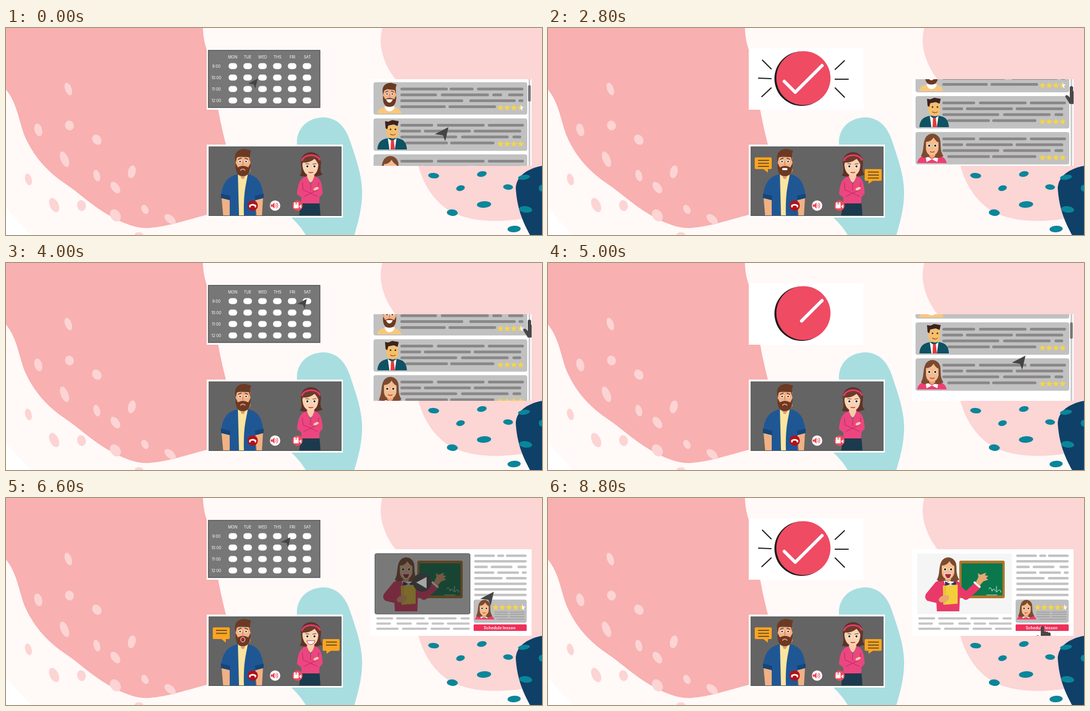
Recreate the animation shown at these times as an HTML page. Size 980x380 px, loop 9 s.

```html
<!DOCTYPE html>
<html lang="en">
<head>
<meta charset="utf-8">
<style>
  html, body { margin: 0; width: 980px; height: 380px; overflow: hidden; }
  svg { display: block; }
  text { font-family: Inter, sans-serif; text-anchor: middle; fill: #fff; }
  .line { fill: none; stroke-linecap: round; stroke-linejoin: round; }
</style>
</head>
<body>
<svg id="stage" width="980" height="380" viewBox="0 0 980 380"></svg>
<script>
const ellipses = (list, fill) => `<g fill="${fill}">` + list.map(([x, y, rx, ry, turn = 0]) =>
  `<ellipse rx="${rx}" ry="${ry}" transform="translate(${x} ${y}) rotate(${turn})"/>`).join('') + '</g>';

// Each row of bars is written as "from-to from-to ..."
const bars = (y, spec, width = 5, color = '#898787') => spec.split(' ').map(s => {
  const [a, b] = s.split('-').map(Number), r = width / 2;
  return `<path class="line" stroke="${color}" stroke-width="${width}" d="M${a + r} ${y}H${b - r}"/>`;
}).join('');

const star = (x, y, fill = '#fbd63c') => `<polygon fill="${fill}" points="${
  Array.from({ length: 10 }, (_, i) => {
    const r = i % 2 ? 2.6 : 6.3, a = i * Math.PI / 5;
    return (x + r * Math.sin(a)).toFixed(1) + ',' + (y - r * Math.cos(a)).toFixed(1);
  }).join(' ')}"/>`;
const stars = (x, y, count, half) => Array.from({ length: count }, (_, i) =>
  star(x + i * 12.3, y, half && i === count - 1 ? 'url(#half)' : undefined)).join('');

const background = `
  <rect width="980" height="380" fill="#fff9f8"/>
  <path fill="#fff" d="M0 330L45 380H0Z"/>
  <path fill="#f8b0b0" d="M0 0H360C361 25 366 38 372 52C380 80 381 120 388 150C393 178 398 197 402 214L410 320L367 343C330 352 300 364 262 367C235 369 205 354 185 342C155 324 135 304 110 287C76 265 50 235 34 198C22 165 20 138 0 113Z"/>
  ${ellipses([[114, 112, 6, 12, -20], [59, 187, 7, 12, -15], [116, 179, 8, 9, -20], [166, 205, 8, 10, -35],
    [107, 241, 7, 15, -22], [166, 271, 6, 11, -15], [230, 264, 7, 12, 12], [41, 278, 6, 11, -15],
    [200, 293, 7, 12, -35], [88, 325, 8, 14, -25], [138, 326, 8, 10, -15], [200, 344, 9, 12, -35],
    [254, 333, 6, 9, -30], [300, 351, 7, 12, -50], [243, 380, 8, 5]], '#fcd4d4')}
  <path fill="#fcd5d5" d="M688 0C679 34 692 68 712 94C732 140 747 200 754 253C764 290 784 320 815 338C850 355 900 361 980 344V0Z"/>
  <path fill="#a8dee0" d="M532 214C530 186 550 164 582 164C608 166 622 184 630 210C640 240 650 268 651 298C652 330 643 358 637 380H548C539 365 531 357 521 347Z"/>
  <path fill="#0f4068" d="M980 253C955 258 934 270 932 293C934 330 944 354 958 380H980Z"/>
  ${ellipses([[782, 271, 10, 5, 5], [870, 268, 9, 5, -12], [831, 294, 8, 5, -12], [874, 324, 13, 6, -3],
    [816, 339, 10, 6, 5], [929, 369, 12, 6, -4], [918, 292, 9, 5, 5], [947, 274, 11, 4.5, -8],
    [950, 333, 12, 6, 6], [979, 294, 5, 6]], '#09869a')}`;

const calendar = `<g id="calendar">
  <rect x="370" y="41" width="204" height="105" fill="#777" stroke="#505050" stroke-width="1.4"/>
  ${['MON', 'TUE', 'WED', 'THS', 'FRI', 'SAT'].map((day, i) =>
    `<text x="${414.5 + i * 27.3}" y="55.5" font-size="7">${day}</text>` +
    [70, 91, 112, 133].map(y => `<rect x="${407 + i * 27.1}" y="${y - 5.5}" width="15.5" height="11" rx="5" fill="#fff"/>`).join('')).join('')}
  ${[9, 10, 11, 12].map((h, i) => `<text x="384.5" y="${72.5 + i * 21}" font-size="7">${h}:00</text>`).join('')}
  <use id="slotCursor" href="#arrow"/></g>`;

const confirmation = `<g id="confirmation">
  <circle cx="464" cy="93" r="50" fill="#1d1b1c"/><circle cx="467" cy="92" r="49.5" fill="#ef4b63"/>
  <path id="check" class="line" stroke="#fff" stroke-width="6" pathLength="100" d="M501 69L452 118L432 98"/>
  <path id="rays" class="line" stroke="#1d1b1c" stroke-width="2" pathLength="100" d=""/></g>`;

const bubble = (x, y, tail) => `<g transform="translate(${x} ${y})">
  <rect width="31" height="21.5" rx="2" fill="#fba520"/><path fill="#fba520" d="${tail}"/>
  ${[5.5, 11, 16.5].map(v => `<path class="say" stroke="#6e5125" stroke-width="2" d="M6 ${v}H26"/>`).join('')}</g>`;

const call = `
  <rect x="367" y="214" width="249" height="134" fill="#fff"/>
  <rect x="371" y="218" width="242" height="126.5" fill="#646464" stroke="#4d4d4d"/>
  <path fill="#f0b184" d="M394 310H412V344H397ZM455 310H470L468 344H458Z"/>
  <path fill="#1f5795" d="M421 269L446 269C461 274 469 284 471 312L456 316V344H409V316L393 312C395 285 404 274 421 269Z"/>
  <path fill="#164578" d="M393 304L410 308V316L393 312ZM455 308L471 304V312L456 316Z"/>
  <path fill="#fbe59f" d="M424 269H442C439 288 434 300 435 344H426Z"/>
  <path fill="#e09b70" d="M425 264H441L435 277H431Z"/>
  <use href="#beardy"/>
  <g id="manMouths">
    <path class="line" stroke="#e08c80" stroke-width="2" d="M429 261Q433 257 437 261"/>
    <rect x="428" y="257" width="10" height="4" rx="2" fill="#fff"/>
    <ellipse cx="433" cy="260" rx="4" ry="4.5" fill="#a82430" stroke="#fff" stroke-width="1"/></g>
  <path fill="#5f3225" d="M537 271C545 262 535 248 541 238C548 224 570 225 575 240C578 252 571 262 579 269C566 275 548 274 537 271Z"/>
  <path fill="#1c3a4d" d="M540 318H573L575 344H536Z"/>
  <path fill="#f8cda8" d="M551 262H563L564 277L557 284L550 277Z"/>
  <path fill="#ec4680" d="M550 272L557 288L564 272C573 274 578 282 579 304L573 311V322H540V311L532 305C534 285 538 275 550 272Z"/>
  <path class="line" stroke="#c42d65" stroke-width="1.3" d="M542 284L543 297L569 309M572 284L570 297L545 309M557 288V298"/>
  <ellipse cx="567" cy="295" rx="5" ry="2.5" fill="#f8cda8" transform="rotate(-25 567 295)"/>
  <path fill="#fad3b0" d="M542 246C542 237 570 237 571 246C572 262 566 271 557 271C548 271 541 262 542 246Z"/>
  <path fill="#6d3a2a" d="M540 256C538 236 549 231 559 233C570 232 575 242 573 256C571 249 568 244 564 240C557 247 547 247 543 247Z"/>
  <path class="line" stroke="#e63b72" stroke-width="3" d="M541 243C546 231 568 230 574 242"/>
  <g fill="#fff"><circle cx="551" cy="254" r="3.2"/><circle cx="564" cy="254" r="3.2"/></g>
  <g fill="#3d2018"><circle cx="551" cy="254" r="2"/><circle cx="564" cy="254" r="2"/></g>
  <path class="line" stroke="#5f3225" stroke-width="1.2" d="M548 249L554 250M561 250L567 249"/>
  <path id="womanClosed" class="line" stroke="#cb3e52" stroke-width="1.8" d="M554 265Q557 266 561 265"/>
  <path id="womanSmile" fill="#fff" stroke="#b53848" d="M550 262H565Q563 269 557 269Q552 269 550 262Z"/>
  <g id="bubbles">${bubble(378, 237.5, 'M14 20H24V28Z')}${bubble(579, 259, 'M7 20H17L7 27Z')}</g>
  <circle cx="451" cy="326" r="9.5" fill="#b11219"/>
  <path class="line" stroke="#fff" stroke-width="3" d="M446 328V326Q451 323 456 326V328"/>
  <circle cx="492" cy="326" r="9.5" fill="#fff"/>
  <path fill="#ee4a5c" d="M484 324H487L491 320.500V331.500L487 328H484Z"/>
  <path class="line" stroke="#ee4a5c" stroke-width="1.2" d="M493 323.500Q495 326 493 328.500M495 321.500Q499 326 495 330.500"/>
  <circle cx="533" cy="326" r="9.5" fill="#ee4a5c"/>
  <path fill="#fff" d="M526 324H535V331H526ZM536 327L540 324V331L536 328Z"/>
  <g fill="#fff"><circle cx="528" cy="322" r="2"/><circle cx="533" cy="322" r="2"/></g>`;

const row2 = ['721-781 788-875 881-947', '721-759 764-850 855-942', '721-825 832-919 926-942', '730-808 812-893'];
const row1 = ['721-808 811-855 861-946', '721-788 795-883 889-907 918-946', '721-836 847-932 937-946', '721-804 809-896'];
const card = (y, rows, half, avatar) => `<rect x="672" y="${y}" width="281" height="59.5" rx="4" fill="#c1c1c1"/>
  ${rows.map((spec, i) => bars(y + 12.5 + i * 10.8, spec)).join('')}${stars(904, y + 47, 4, half)}${avatar}`;

const list = `<g id="list"><g id="cards">
  ${card(99.500, row1, true, `
    <path fill="#f7c87c" d="M678 157C680 147 690 144 701 144C713 144 721 148 723 157Z"/>
    <path fill="#fff" d="M692 144H711Q709 153 701 153Q694 153 692 144Z"/>
    <g transform="translate(320 -94.5) scale(.88)"><use href="#beardy"/>
      <path fill="#fff" d="M426 256H440Q438 263 433 263Q428 263 426 256Z"/></g>`)}
  ${card(166, row2, false, `
    <path fill="#0e5263" d="M679 223C680 207 689 204 699 202H714C726 204 732 208 733 223Z"/>
    <path fill="#fff" d="M698 202L706 208L714 202L711 223H701Z"/>
    <path fill="#e8383d" d="M704 206H709L711 223H703Z"/>
    <path fill="#f4c06c" d="M695 179H717V195Q715 203 707 203Q697 202 695 192Z"/>
    <path fill="#3f2219" d="M694 184L693 171L699 172L706 169L718 171L716 180L709 177L699 179L697 186Z"/>
    <g fill="#3f2219"><circle cx="703" cy="186" r="1.5"/><circle cx="712" cy="186" r="1.5"/></g>
    <path class="line" stroke="#b5523d" stroke-width="1.5" d="M703 195Q708 198 712 195"/>`)}
  ${card(232, row2, false, `
    <path fill="#ee3f70" d="M675 289C677 277 688 273 702 273C716 273 727 278 729 289Z"/>
    <path fill="#fff" d="M690 274L702 282L714 274L712 287L702 282L692 287Z"/>
    <use href="#lady" x="702" y="256"/>`)}</g>
  <path stroke="#c9c9c9" stroke-width="3" d="M957 94V253"/>
  <rect id="thumb" x="954.5" width="5" height="30" rx="2" fill="#777"/></g>`;

const teacher = `
  <rect x="752" y="115" width="83" height="69" rx="3" fill="#b0762a"/>
  <rect x="756" y="120" width="75" height="59" fill="#0b774d"/>
  <path class="line" stroke="#d9eee0" d="M806 167Q809 160 812 171Q815 163 818 171M820 162V173Q827 164 828 173M802 178H821"/>
  <g id="arm"><path class="line" stroke="#ea3968" stroke-width="14" d="M749 166L764 180L784 162"/>
    <path class="line" stroke="#fff" stroke-width="4" d="M780 155L789 163"/>
    <path fill="#e8a872" d="M782 155L787 145L786 138L791 141L801 137L799 142L805 143L801 147L805 150L796 153L789 161Z"/></g>
  <path fill="#ea3968" d="M709 154L722 149H743L754 156L752 208H711L710 190L694 189Q687 184 691 176Z"/>
  <path fill="#fff" d="M723 150H743L738 165H728Z"/>
  <path fill="#283466" d="M726 153L736 158L746 153V162L736 158L726 162Z"/>
  <path fill="#f4ce3a" d="M722 161L749 159V194L723 196Z"/><path stroke="#c8a729" d="M726 162V195"/>
  <path class="line" stroke="#ea3968" stroke-width="11" d="M701 185L714 188"/>
  <ellipse cx="724" cy="185" rx="10" ry="6" fill="#e8a872" transform="rotate(-20 724 185)"/>
  <use href="#lady" x="731" y="130"/>
  <path fill="#a9283d" stroke="#fff" d="M725 139H738Q736 148 731 148Q727 147 725 139Z"/>`;

const detail = `<g id="detail">
  <rect x="675" y="102" width="173" height="111" rx="2" fill="#f5f5f6"/>${teacher}
  <g id="paused"><rect x="674.5" y="102" width="174" height="111" rx="3" fill="#222" fill-opacity=".58" stroke="#555"/>
    <circle cx="761" cy="155" r="17" fill="#333"/><path fill="#a5a5a5" d="M750 155L769 145V166Z"/></g>
  ${['677-708 713-766 772-824 831-848', '677-704 714-742 750-773 778-801 806-848', '677-718 724-770 776-812 817-848']
    .map((s, i) => bars(221 + i * 9.500, s, 4, '#c5c5c5')).join('')}
  ${['856-894 898-911 914-952', '856-952', '856-881 886-926 935-952', '856-893 898-938 943-952', '856-908 914-952',
    '856-952', '856-952', '856-952'].map((s, i) => bars(106 + i * 10.3, s, 4.5, '#c2c2c2')).join('')}
  <rect x="855" y="186.500" width="97" height="42.500" rx="4" fill="#bebebe"/>
  ${[209.500, 213.500, 218, 222.500].map((y, i) => bars(y, i < 3 ? '893-918 921-948' : '897-948', 1.7, '#9c9c9c')).join('')}
  ${stars(895, 201, 5, true)}
  <path fill="#ee3f70" d="M857 223Q861 212 874 212Q889 212 893 223Z"/>
  <path fill="#fff" d="M867 212L874 218L882 212L880 221L874 218L868 221Z"/>
  <use href="#lady" transform="translate(874 202) scale(.72)"/>
  <rect id="button" x="855" y="232" width="97" height="12" rx="1.5" fill="#ef315a"/>
  <text x="902.5" y="240.800" font-size="7.3" font-weight="600">Schedule lesson</text></g>`;

document.getElementById('stage').innerHTML = `<defs>
  <linearGradient id="half"><stop offset=".5" stop-color="#fbd63c"/><stop offset=".5" stop-color="#fff"/></linearGradient>
  <clipPath id="panel"><path d="M666 94H961V253H666Z"/></clipPath>
  <path id="arrow" fill="#444" d="M0 0L-25 13L-10 15L-6 26Z"/>
  <path id="hand" fill="#484848" d="M-3 2Q0 -2 3 2V10Q6 8 7 11Q10 9 11 12Q15 11 15 15V25L11 33H-3L-11 20Q-11 15 -6 18L-3 21Z"/>
  <g id="beardy"><path fill="#f2b387" d="M420 237H447V262Q443 270 433 270Q423 269 420 260Z"/>
    <path fill="#6c3923" d="M420 247C416 231 422 222 437 222L448 225L446 232L447 247L444 237L428 235L422 238Z"/>
    <path fill="#6c3923" d="M420 248L424 256Q433 250 443 256L447 248C448 264 443 272 433 272C423 272 418 263 420 248Z"/>
    <g fill="#fff"><circle cx="428" cy="245" r="2.800"/><circle cx="439" cy="245" r="2.800"/></g>
    <g fill="#3a2018"><circle cx="428" cy="245" r="1.600"/><circle cx="439" cy="245" r="1.600"/></g>
    <path class="line" stroke="#6c3923" stroke-width="1.6" d="M425 241L430 239M437 239L442 241"/>
    <path class="line" stroke="#dd8c68" stroke-width="2" d="M433 246V251"/></g>
  <g id="lady"><path fill="#7c4a2f" d="M-12 -13C-6 -24 10 -24 15 -10C17 0 14 10 21 20Q12 26 3 22H-8Q-16 25 -20 20C-14 10 -17 -3 -12 -13Z"/>
    <path fill="#e8a872" d="M-5 12H6V20L0 25L-5 20Z"/>
    <path fill="#f3bd8e" d="M-11 -6Q-2 -6 3 -14Q7 -7 12 -5V7Q10 18 0 19Q-10 18 -11 7Z"/>
    <g fill="#fff"><circle cx="-5" cy="1" r="3"/><circle cx="6" cy="1" r="3"/></g>
    <g fill="#3a2018"><circle cx="-5" cy="1" r="2"/><circle cx="6" cy="1" r="2"/></g>
    <path class="line" stroke="#c23b4b" stroke-width="1.600" d="M-3 12Q1 14 4 12"/></g>
  </defs>${background}<rect x="367" y="37" width="210" height="113" fill="#fff"/>${calendar}${confirmation}${call}
  <g clip-path="url(#panel)"><rect x="666" y="94" width="295" height="159" fill="#fff"/>${list}${detail}
  <use id="pointer" href="#arrow"/><use id="finger" href="#hand"/></g>`;

const el = id => document.getElementById(id);
const show = (node, on) => node.style.display = on ? '' : 'none';
const move = (id, x, y, scale = 1) => el(id).setAttribute('transform', `translate(${x} ${y}) scale(${scale})`);

// Linear interpolation through [time, ...values] keys
function track(keys, t) {
  const i = keys.findIndex(k => k[0] > t);
  if (i < 0) return keys.at(-1).slice(1);
  if (i === 0) return keys[0].slice(1);
  const a = keys[i - 1], b = keys[i], u = (t - a[0]) / (b[0] - a[0]);
  return a.slice(1).map((v, j) => v + (b[j + 1] - v) * u);
}

const slotPath = [[0, 460, 93], [600, 520, 72], [1000, 550, 66], [1200, 553, 65]];
const pointerPath = [[0, 809, 182], [1400, 914, 122], [2000, 957, 97], [4600, 957, 109], [5000, 873, 170],
  [5400, 860, 190], [5800, 890, 173], [6600, 892, 172], [7200, 772, 150]];
const scrollPath = [[2000, 0], [2800, 41], [3200, 57], [4000, 26], [4600, 57]];
const rayLines = [[408, 75, 392, 59], [408, 93, 385, 92], [408, 110, 391, 126],
  [525, 76, 542, 60], [525, 94, 549, 94], [525, 110, 542, 127]];

function booking(t) {
  show(el('calendar'), t < 1400);
  show(el('confirmation'), t >= 1400);
  move('slotCursor', ...track(slotPath, t), .7);
  const drawn = Math.min(100, Math.max(0, (t - 1600) / 400 * 54));
  show(el('check'), drawn > 0);
  el('check').setAttribute('stroke-dasharray', `${drawn} 200`);
  const grow = Math.max(0, Math.min(1, (t - 2400) / 400));
  show(el('rays'), grow > 0);
  el('rays').setAttribute('d', rayLines.map(([x, y, x2, y2]) =>
    `M${x} ${y}L${x + (x2 - x) * grow} ${y + (y2 - y) * grow}`).join(''));
}

function conversation(t) {
  show(el('bubbles'), t >= 1200 && t < 4000);
  document.querySelectorAll('.say').forEach((line, i) => show(line, t >= 1400 + i % 3 * 200));
  const talking = t >= 1400 && t < 3600;
  const beat = t / 200 % 7;
  const mouth = talking ? [1, 2, 1, 0, 2, 1, 0][beat] : 0;
  [...el('manMouths').children].forEach((m, i) => show(m, i === mouth));
  show(el('womanSmile'), mouth === 2);
  show(el('womanClosed'), mouth !== 2);
}

function lesson(t) {
  const [scroll] = track(scrollPath, t);
  show(el('list'), t < 5600);
  show(el('detail'), t >= 5600);
  move('cards', 0, -scroll);
  el('thumb').setAttribute('y', 105 + scroll * .07);
  show(el('paused'), t < 7600);
  const wave = t >= 7600 && t < 8600 ? 4 * Math.sin((t - 7600) / 400 * Math.PI) : 0;
  el('arm').setAttribute('transform', `rotate(${wave} 764 180)`);
  const dragging = t >= 2000 && t < 4800, booked = t >= 8600;
  show(el('pointer'), !dragging && t < 7600);
  show(el('finger'), dragging || booked);
  move('pointer', ...track(pointerPath, t));
  move('finger', ...(booked ? [904, 235] : [957, 99 + scroll * .18]));
}

function frame(now) {
  const t = Math.floor(now % 9000 / 200) * 200;
  booking(t % 3000);
  conversation(t % 5000);
  lesson(t);
  requestAnimationFrame(frame);
}
frame(performance.now());
</script>
</body>
</html>
```
